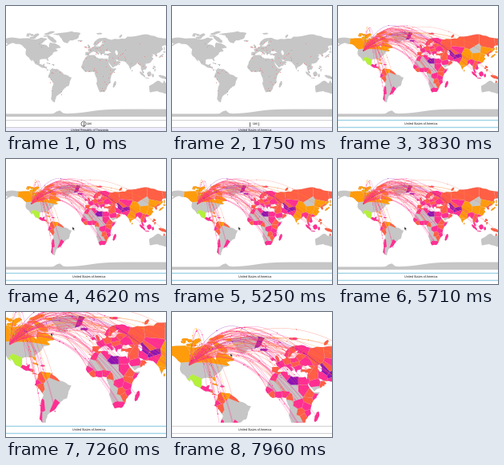
Animation of 200x157 px, one loop 8 s. Source, as a matplotlib script:

```python
import numpy as np
import matplotlib.pyplot as plt
from matplotlib.animation import FuncAnimation
from matplotlib.collections import LineCollection, PolyCollection
from matplotlib.patches import Circle, Polygon, Rectangle
from matplotlib.path import Path

W, H, DPI = 200, 157, 100
STEP, LOOP = 40, 8000
MAP_H = 139
PX = 72 / DPI

GRAY, PINK, CORAL, ORANGE = "#c6c6c6", "#ff2f92", "#ff5f45", "#ff9c0c"
PURPLE, LIME = "#8c14b4", "#b4f03c"

PICK, BLUR = 2380, 7490
HOME = np.array([-112.5, 45.7])
LIFT = 78

plt.rcParams["font.family"] = "Liberation Sans"
plt.rcParams["text.hinting"] = "none"
rng = np.random.default_rng(4)


def pts(*xy):
    return np.array(xy, float).reshape(-1, 2)


def rough(ring, levels=2):
    """Break each side of a ring at a randomly shifted midpoint."""
    for _ in range(levels):
        side = np.roll(ring, -1, 0) - ring
        normal = side[:, ::-1] * (-1, 1)
        size = np.hypot(*side.T)[:, None]
        shift = rng.uniform(-1, 1, size.shape) * np.minimum(0.12, 1.3 / size)
        mid = ring + side / 2 + normal * shift
        ring = np.stack([ring, mid], 1).reshape(-1, 2)
    return ring


def island(lon, lat, w, h, tilt=0):
    a = -np.linspace(0, 2 * np.pi, 8, endpoint=False)
    x, y, r = w / 2 * np.cos(a), h / 2 * np.sin(a), np.radians(tilt)
    turn = np.array([[np.cos(r), np.sin(r)], [-np.sin(r), np.cos(r)]])
    return rough(np.stack([x, y], 1) @ turn + (lon, lat), 1)


def isles(lon, lat, dx, dy, n, size):
    spots = rng.uniform((lon - dx, lat - dy), (lon + dx, lat + dy), (n, 2))
    return [island(*p, *(size * rng.uniform(0.5, 1.2, 2) * (1.6, 0.8))) for p in spots]


# Key points of the coasts as longitude, latitude
north_america = pts(
    -167, 65, -156, 71, -128, 70, -108, 68, -95, 71, -82, 68.5, -94, 59,
    -82, 55, -79, 52, -77, 62, -65, 59, -56, 52, -66, 50, -62, 46, -70, 43,
    -76, 36, -81, 31, -80, 25.5, -84, 30, -97, 28, -97, 20, -91, 18.5, -87, 21,
    -88, 16, -83.5, 15, -82, 9, -77, 8, -86, 12, -97, 16, -105, 20, -113, 31,
    -110, 23, -117, 32, -124, 40, -123, 49, -135, 58.5, -149, 61, -164, 54.5,
    -158, 59)
eurasia_north = pts(
    -9, 37, -9, 43, -1, 44, -4.5, 48.5, 8, 54, 9, 57.5, 12, 54, 20, 55, 23, 59,
    29, 60, 22, 61, 25, 65.5, 17, 61, 14, 56, 6, 58, 14, 68, 28, 71, 41, 67,
    68, 69, 72, 73, 104, 77.5, 130, 71.5, 180, 69, 180, 64, 162, 60, 157, 51,
    155, 59, 138, 54, 140, 48, 128, 40)
eurasia_south = pts(
    129, 35, 126, 35, 124, 39, 118, 39, 122, 37, 119, 34, 122, 30, 116, 23,
    107, 21, 109, 12, 105, 9, 101, 13, 104, 2, 100, 5, 98, 16, 91, 22.5,
    80, 14, 77.5, 8, 73, 19, 67, 25, 57, 26, 49, 30, 51, 25, 56, 26, 59, 22.5,
    44, 13, 35, 28, 36, 36.5, 27, 37, 27, 41, 41, 41.5, 36, 46, 29, 45,
    28.5, 41.5, 23.5, 40, 22, 36.5, 19.5, 41, 13, 45, 18, 40, 16, 38, 9, 44,
    3, 43, -2, 37)
africa = pts(
    -6, 35.5, 10, 37, 11, 33.5, 20, 31, 33, 31, 39, 16, 43, 11.5, 51, 11.5,
    41, -2, 40, -15, 35, -21, 32, -28, 27, -34, 19, -34.5, 12, -17, 13, -8,
    9, 1, 9, 4.5, -8, 4.5, -17, 14.5, -13, 26)
south_america = pts(
    -77, 8, -72, 12, -62, 10.5, -50, 0, -35, -6, -39, -14, -41, -22, -48, -26,
    -57, -37, -65, -43, -68, -54, -75, -48, -70, -18, -81, -5, -77, 4)
australia = pts(
    114, -22, 130, -12, 140, -17, 142.5, -11, 153, -26, 147, -38, 138, -35,
    130, -32, 115, -34.5)
greenland = pts(-72, 78, -35, 83.5, -18, 80, -22, 71, -38, 66, -43, 60, -52, 64,
                -55, 70, -60, 76)
lon = np.linspace(-180, 180, 60)
ice = -71.5 + 4.5 * np.tanh(lon / 30) + 7 * np.exp(-((lon + 60) / 6) ** 2)
antarctica = np.vstack([np.stack([lon, ice], 1), pts(180, -90, -180, -90)])

mainlands = [north_america, np.vstack([eurasia_north, eurasia_south]), africa,
             south_america, australia, greenland]
coasts = [rough(m) for m in mainlands] + [antarctica]
coasts += [
    island(-73, 68, 22, 8, -35), island(-110, 71, 13, 5), island(-78, 80, 22, 5, 15),
    island(-80, 21.5, 9, 1.5, -18), island(-71, 19, 6, 2), island(-19, 65, 10, 3),
    island(-2, 54, 4, 9, 25), island(-8, 53, 4, 4), island(47, -19, 5, 14, -18),
    island(81, 7.5, 2, 4), island(59, 74, 4, 8, -40), island(18, 79, 12, 3),
    island(137, 36, 12, 3, 40), island(143, 43.5, 5, 3), island(143, 50, 2, 8),
    island(101, 0, 16, 4, -45), island(110, -7, 9, 1.6, -8), island(114, 1, 9, 10),
    island(121, -2, 4, 7), island(140, -5, 18, 6, -22)]
coasts += isles(-100, 76, 20, 3, 10, 5) + isles(123, 11, 2, 6, 6, 3)

# One seat per country; each also receives an arc
seats = {
    PINK: pts(
        -90, 15, -71, 19, -79, -1, -74, -31, -56, -33, -8, 53, 2, 47, 12, 43,
        19, 52, 22, 42, 9, 62, 27, 64, 32, 49, 67, 48, 54, 32, 46, 23, 68, 28,
        95, 20, 107, 15, 102, 4, 113, -2, -7, 32, 9, 34, 30, 27, 30, 15, 46, 5,
        -14, 14, -1, 8, 8, 9, 24, -3, 35, -6, 37, -15, 24, -30, 47, -19),
    CORAL: pts(
        -83, 9, -74, 4, -58, 5, -76, -9, -2, 54, -4, 40, 10, 51, 20, 47, 15, 61,
        25, 57, 34, 39, 43, 33, 56, 20, 128, 37, 122, 13, 145, -6, 39, 9,
        -10, 8, 13, 5, 38, 1, 27, -14, 30, -19, 101, 17, 63, 42, 95, 60),
    ORANGE: pts(-98, 60, -79, 22, -66, 8, 79, 22, 104, 36, 138, 36),
    PURPLE: pts(-18, 65, 18, 27, 59, 38.5, 66, 34),
    LIME: pts(-104, 24),
}
# Further seats that widen large countries or stay gray
wide = {
    PINK: pts(-77, -46),
    CORAL: pts(45, 57, 68, 60, 125, 60, 155, 64),
    ORANGE: pts(-122, 60, -75, 56, -75, 70, -105, 72, 88, 37, 118, 32, 122, 45,
                78, 13),
    GRAY: pts(
        -98, 38, -120, 38, -78, 38, -155, 64, -42, 74, -60, 0, -52, -10,
        -62, -6, -45, -20, -64, -17, -63, -30, -66, -46, 2, 28, -10, 21, -2, 17,
        9, 17, 18, 15, 21, 7, 18, -12, 17, -21, 24, -22, 12, -1, 47, 15,
        103, 47, 120, -25, 134, -25, 146, -25),
}
wide[GRAY] = np.vstack([wide[GRAY], [(x, -85) for x in range(-180, 181, 30)]])


def flatten(groups):
    return (np.vstack(list(groups.values())),
            [c for c, p in groups.items() for _ in p])


goals, tints = flatten(seats)
extra, extra_tints = flatten(wide)
seeds, colors = np.vstack([goals, extra]), tints + extra_tints


def cell(k):
    """Part of the map nearer to seed k than to any other seed."""
    poly = pts(-180, -90, 180, -90, 180, 90, -180, 90)
    for j, other in enumerate(seeds):
        n = other - seeds[k]
        side = poly @ n - n @ (other + seeds[k]) / 2
        if j == k or side.max() <= 0:
            continue
        kept = []
        for a, b, da, db in zip(poly, np.roll(poly, -1, 0), side, np.roll(side, -1)):
            if da <= 0:
                kept.append(a)
            if da * db < 0:
                kept.append(a + (b - a) * da / (da - db))
        poly = np.array(kept)
    return poly


tinted = [k for k, c in enumerate(colors) if c != GRAY]

# Small states without an area of their own
near = goals[rng.integers(0, len(goals) - 8, 26)] + rng.normal(0, 3, (26, 2))
goals = np.vstack([goals, near])
tints = tints + [PINK if k % 4 else CORAL for k in range(len(near))]


def arc(goal, u):
    u = np.asarray(u)[:, None]
    return HOME + u * (goal - HOME) + 2 * u * (1 - u) * (0, LIFT)


arcs = [arc(g, np.linspace(0, 1, 31)) for g in goals]
phase = rng.uniform(0, 1, len(goals))

fig = plt.figure(figsize=(W / DPI, H / DPI), dpi=DPI, facecolor="white")
ax = fig.add_axes([0, 1 - MAP_H / H, 1, MAP_H / H])
ui = fig.add_axes([0, 0, 1, 1])
for a in (ax, ui):
    a.axis("off")
ui.set(xlim=(0, W), ylim=(H, 0))

ax.add_collection(PolyCollection(coasts, facecolor=GRAY, edgecolor="none"))
fills = PolyCollection([cell(k) for k in tinted], linewidth=0.15,
                       facecolor=[colors[k] for k in tinted], edgecolor="#ffffff50")
ax.add_collection(fills)
outline = Path.make_compound_path(*[Path(np.vstack([c, c[:1]])) for c in coasts])
fills.set_clip_path(outline, ax.transData)
ax.add_patch(Polygon(island(51, 42, 5, 10, 15), fc="white"))
marks = ax.scatter(*goals.T, s=0.5, lw=0)
lines = LineCollection([], colors=tints, alpha=0.55)
ax.add_collection(lines)
dots = ax.scatter([], [], lw=0, zorder=4)

edges = [ui.plot([0, W], [y, y])[0] for y in (142.5, 151.5)]
box = ui.add_patch(Rectangle((0, 152), W, 5, fc="#ececfc"))
font = dict(fontsize=3.8 * PX, ha="center", va="baseline", color="#111111")
field = ui.text(104, 149.2, "", **font)
hint = ui.text(104, 157.2, "", **font)
caret = ui.plot([108, 108], [145.5, 150], color="#333333", lw=0.4)[0]
beam = ui.plot([97, 97], [145.5, 150.5], color="#222222", lw=0.5)[0]
ring = ui.add_patch(Circle((97, 148), 3, fc="none", ec="#444444", lw=0.5))
ARROW = pts(0, 0, 0, 4.2, 1, 3.4, 1.8, 5, 2.5, 4.6, 1.8, 3.1, 3, 3)
arrow = ui.add_patch(Polygon(ARROW, fc="#222222", ec="white", lw=0.2))


def ease(t, start, end):
    u = np.clip((t - start) / (end - start), 0, 1)
    return u * u * (3 - 2 * u)


def view(t):
    """Scale and pixel position of longitude 0, latitude 0."""
    s = np.interp(t, [5720, 6330, 6900], [0.65, 0.88, 1])
    k, drag = s / 0.65, ease(t, BLUR - 40, 7960)
    return s, 83 + 22 * k + 17 * drag, 85 + k + 26 * drag


def pointer(t):
    return (np.array([100, 108]) + ease(t, 4100, 4500) * np.array([-17, -23])
            + ease(t, 6650, 7150) * np.array([-27, -59])
            + ease(t, BLUR - 40, 7960) * np.array([17, 26]))


def draw(i):
    t = i * STEP
    s, x0, y0 = view(t)
    ax.set_xlim(-x0 / s, (W - x0) / s)
    ax.set_ylim((y0 - MAP_H) / s, y0 / s)
    on = t >= PICK
    zoom = s / 0.65

    for art in (fills, lines, dots):
        art.set_visible(on)
    marks.set_color(tints if on else "#e88a8a")
    marks.set_sizes([0.5 * zoom ** 2])
    if on:
        n = 2 + int(29 * min(1, (t - PICK) / 600))
        lines.set_segments([a[:n] for a in arcs])
        lines.set_linewidth(0.26 * zoom ** 0.5)
        run = (t - PICK) / 1900
        u = (run + phase[:, None] + np.arange(3) / 3) % 1
        shown = u <= 2 * run
        dots.set_offsets(np.vstack([arc(g, r[m]) for g, r, m in zip(goals, u, shown)]))
        dots.set_facecolor([c for c, m in zip(tints, shown) for _ in range(m.sum())])
        dots.set_sizes([0.4 * zoom ** 1.5])

    focus = on and t < BLUR
    for e in edges:
        e.set_color("#9fd3e6" if focus else "#c8c8cc")
        e.set_linewidth(1.0 if focus else 0.6)
    country = "United States of America"
    field.set_text(country if on else "Unit")
    hint.set_text(country if t >= 1130 else "United Republic of Tanzania")
    for art in (box, hint, beam):
        art.set_visible(not on)
    ring.set_visible(t < 60)
    caret.set_visible(300 <= t < 770 or 1310 <= t < 1750)
    arrow.set_visible(t >= 4100)
    arrow.set_xy(ARROW + pointer(t))
    return []


anim = FuncAnimation(fig, draw, frames=LOOP // STEP, interval=STEP,
                     init_func=lambda: draw(0), repeat=True, repeat_delay=0)
plt.show()
```
